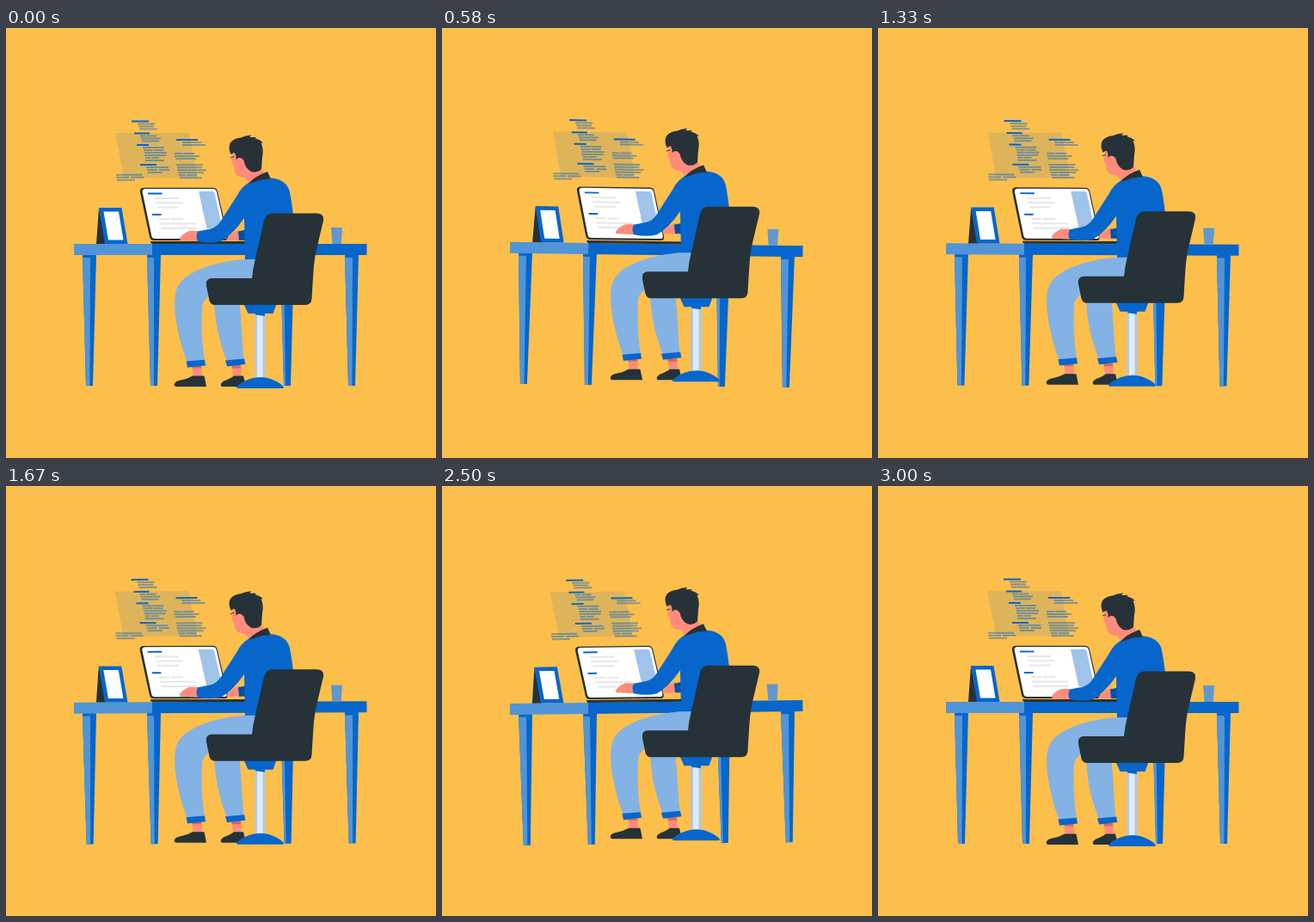
Animation, 500 px wide and 500 px high, one loop 3040 ms. Source, as an HTML page:

```html
<!DOCTYPE html>
<html lang="en">
<head>
<meta charset="utf-8">
<title>Working at a desk</title>
<style>
  html, body { margin: 0; width: 100%; height: 100%; overflow: hidden; background: #fdbf4b; }
  svg { display: block; width: 100vw; height: 100vh; }
  .blue { fill: #0666cc; }
  .mid { fill: #5095d8; }
  .pale { fill: #83b2e5; }
  .dark { fill: #263238; }
  .skin { fill: #ff8b7b; }
  .shade { fill: #d4685f; }
  .white { fill: #fff; }
</style>
</head>
<body>
<svg viewBox="0 0 500 500">
  <rect width="500" height="500" fill="#fdbf4b"/>

  <g id="desk">
    <path class="blue" opacity=".12" d="M127 122H213L223 174.5H137Z"/>
    <g id="code" stroke-width="2"></g>

    <g id="legs"></g>
    <path class="mid" d="M79 251H170V264H79Z"/>
    <path class="blue" d="M170 251H419.500V264H170Z"/>

    <path class="dark" d="M108 209L105 251H116Z"/>
    <path class="blue" d="M108 209H134.500L141.500 251H115Z"/>
    <path class="white" d="M113.500 213.500H131L136.500 246.500H119Z"/>
    <path fill="#6098ce" d="M378 232H391L389.800 251H379.500Z"/>

    <path class="dark" d="M160 185.700H241Q245 186 246 190L258 243Q258.500 247 254 247H172Q168 247 167 243L156 191Q155 186 160 185.700Z"/>
    <path class="white" d="M162.500 187H240.500Q244 187 245 190.500L256.500 242Q257 245 254 245H173.500Q170 245 169.300 242L158.700 191Q158 187 162.500 187Z"/>
    <path fill="#9fc3e9" d="M224 190H240Q242 190 242.500 192L251.500 233H233.500Z"/>
    <g id="screen" stroke-width="1.900"></g>
    <path class="dark" d="M168 248H280V251H171Q168 251 168 248Z"/>
  </g>

  <g id="worker">
    <path class="skin" d="M272 234.500V247H256Q258 242 264 238Z"/>
    <path fill="#0450a3" d="M270 236.500L279 234.500V247H271Z"/>

    <path class="shade" d="M262 392H273L273.500 397H263Z"/>
    <path class="skin" d="M263 395.500H273.500V406H264Z"/>
    <path class="dark" d="M250 414Q251 411 256 409.500Q262 407 265 404.500H276L279 417H252Q249 417 250 414Z"/>
    <path class="pale" d="M242 316C243 345 248 364 257 388L276.500 386C274 360 274 340 271 316Z"/>
    <path class="blue" d="M255 386.500L277 384.500L278.500 391L257 393.500Z"/>

    <path class="shade" d="M216 392H227L227.500 397H217Z"/>
    <path class="skin" d="M217 395.500H227.500L228 406H217.500Z"/>
    <path class="dark" d="M196 413.500Q197 410.500 203 409.500Q211 408 217 404.500H230.500L233 417H198Q195 416.500 196 413.500Z"/>
    <path class="pale" d="M290 268C245 270 210 282 200 300C191 316 199 358 211 389L231 387C227 360 227 335 228.500 321Q231 314 240 310L290 300Z"/>
    <path class="blue" d="M209.500 387.500L231 385.800L232 392.500L211 394.800Z"/>

    <path class="skin" d="M224 236L213 236Q205 239 202 244.500Q202 248 206 247L224 248Z"/>
    <path class="skin" d="M263 143Q264 149 263 152L262.500 157.500Q263 159 264.500 159L266 167Q268 174 278 174L283 181L301 169L288 150Z"/>
    <path class="blue" d="M283 179.500Q274 184 268 196L250 224Q245 232 238 233.500L223 236.500Q220 242 223 248Q238 251 250 248Q264 240 277 221L278 269H330L334 218Q332 200 329.500 189Q325 175 306 174.500Z"/>
    <path class="dark" d="M282 181Q288 173 304 167L308 175.500Q295 176 288 179.500Z"/>
    <path class="dark" d="M261.500 147Q257.500 138 261.500 132.500Q266 128 273 127.500Q278 125 285.500 124.500L283 127H291L289.500 128.500Q295 129.500 299 133.500L296.500 133.500Q300 141 298 150L297 164Q292 169 285 167Q278 163 276.500 154Q272 148 267.500 153Q268 148 266 145Q264 145 261.500 147Z"/>
    <path class="skin" d="M269 155Q270 151 274 152Q277.500 156 276 160Q272 162 269 155Z"/>
    <path d="M261 151L265 149.500" stroke="#263238"/>

    <path fill="#a9caec" d="M289.500 333H301.500V410H289.500Z"/>
    <path fill="#e0ebf8" d="M292 333H298.500V410H292Z"/>
    <path class="blue" d="M290 331H301V335L290 333.500Z"/>
    <path class="blue" d="M276.500 321H314.500L310.500 332H281.500Z"/>
    <path class="blue" d="M268 417.500Q271 413 282 408.500Q288 406 295.500 406Q304 406 309 408.500Q320 413 323 417.500Q323 419 321 419H270Q268 419 268 417.500Z"/>
    <path class="dark" d="M309 215.500H362Q370.500 216 369 224L360 262Q357.500 276 357 290L355.500 315Q355 322 348 322H243Q238 322 236.500 317L233 300Q231.500 291 240 291H286Q287 280 290 268L300 224Q302 216 309 215.500Z"/>
  </g>
</svg>

<script>
const $ = id => document.getElementById(id);
const BLUE = '#0666cc';

const strokes = (y, color, opacity, spans) => spans.map(([a, b]) =>
  `<path d="M${a} ${y}H${b}" stroke="${color}" stroke-opacity="${opacity}"/>`).join('');

// A block is a heading (or none) followed by lines spaced 3 px apart.
function block(y, heading, lines) {
  const top = heading ? strokes(y, BLUE, 1, [heading]) : '';
  return top + lines.map((spans, i) =>
    strokes(y + 3 * (i + (heading ? 1 : 0)), BLUE, .48, spans)).join('');
}

$('code').innerHTML = [
  block(108.5, [146, 166], [[[153, 173]], [[154, 172]], [[155, 176]]]),
  block(122.5, [149, 167], [[[156, 163], [164, 175]], [[157, 180]], [[158, 178]]]),
  block(136, [152, 166], [[[159, 184]], [[160, 171], [172, 183]], [[161, 187]],
    [[161, 186]], [[162, 168], [169, 178]], [[162, 184]]]),
  block(159, [156, 175], [[[163, 189]], [[164, 176], [178, 190]], [[165, 182]]]),
  block(170.8, null, [[[128, 158]], [[128, 143], [145, 160]], [[129, 150]]]),
  block(130, [198, 223], [[[205, 227]], [[205, 232]]]),
  block(146, null, [[[196, 205], [206, 219]], [[196, 225]], [[197, 221]]]),
  block(159.2, null, [[[198, 229]], [[199, 228]], [[199, 233]],
    [[200, 230]], [[201, 209], [210, 222]], [[202, 228]]])
].join('');

const gray = (y, ...spans) => strokes(y, '#e4e6e8', 1, spans);
$('screen').innerHTML =
  strokes(192.5, BLUE, 1, [[165, 181.5]]) + strokes(217, BLUE, 1, [[170, 180.5]]) +
  gray(198, [173, 201]) + gray(203.3, [174, 206]) + gray(208.6, [176, 201]) +
  gray(222.2, [178, 190], [192, 206]) + gray(227.5, [179, 221]) + gray(232.8, [181, 222]);

// Tapered leg: left edge at the top, and width of its lit face.
const leg = (x, lit) =>
  `<path class="blue" d="M${x} 263H${x + 16}L${x + 12} 416H${x + 4}Z"/>` +
  `<path class="mid" d="M${x} 267H${x + lit}L${x + 4 + lit / 2} 416H${x + 4}Z"/>`;
$('legs').innerHTML = leg(89, 9) + leg(164, 8) + leg(319, 4) + leg(394, 9);

const LOOP = 3040, CYCLE = 3000;
// Triangle wave: 0 -> 1 -> 0 over one unit.
const triangle = p => 1 - Math.abs(1 - 2 * (p % 1));

function draw(time) {
  const p = Math.min(time % LOOP, CYCLE) / CYCLE;
  const sway = 2 * triangle(p + .25) - 1;
  $('desk').setAttribute('transform', `rotate(${sway} 249.5 261.5)`);
  $('worker').setAttribute('transform', `translate(0 ${-10 * triangle(2 * p)})`);
}

const start = performance.now();
function tick() {
  draw(performance.now() - start);
  requestAnimationFrame(tick);
}
draw(0);
requestAnimationFrame(tick);
</script>
</body>
</html>
```
